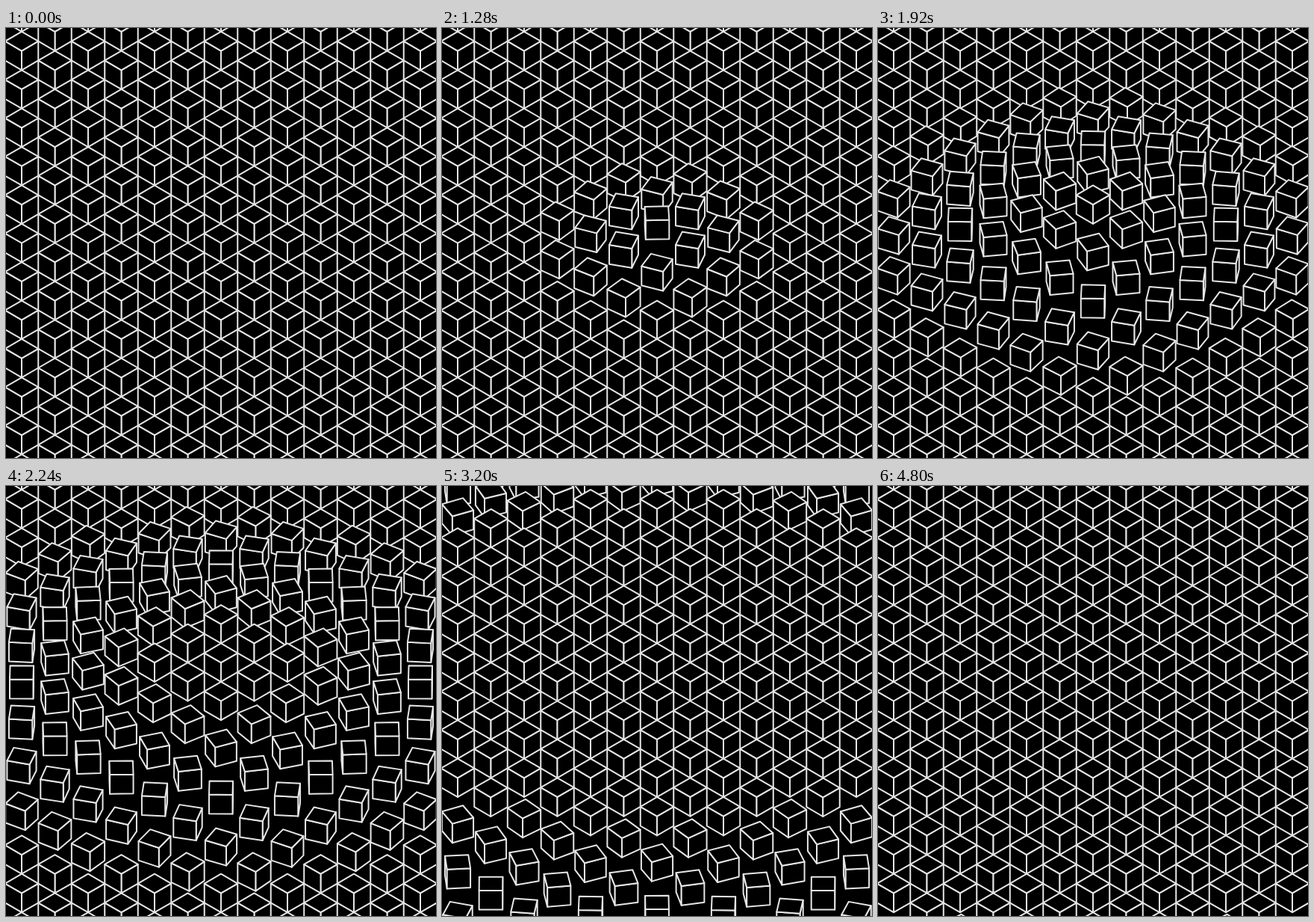
These frames come from a looping animation (576 px wide and 575 px high, 4840 ms). An HTML page with a canvas:

```html
<!DOCTYPE html>
<html lang="en">
<head>
<meta charset="utf-8">
<title>Rising cubes</title>
<style>
  html, body { margin: 0; width: 100%; height: 100%; overflow: hidden; background: #000; }
  canvas { display: block; width: 576px; height: 575px; }
</style>
</head>
<body>
<canvas id="stage" width="576" height="575"></canvas>
<script>
const W = 576, H = 575, LOOP = 4840, STEP = 40;
const COL = 44.5;                  // column spacing
const R = COL / Math.sqrt(3);      // edge length on screen
const SPAN = 3.03;                 // loop length, in units of one cube's turn
const DELAY = 0.00321;             // start delay per pixel of ground distance

const ctx = document.getElementById('stage').getContext('2d');
ctx.lineWidth = 2;
ctx.lineJoin = 'round';
ctx.strokeStyle = '#e6e6e6';
ctx.fillStyle = '#000';

const clamp = v => Math.min(1, Math.max(0, v));
const smooth = t => t * t * (3 - 2 * t);

// Isometric lattice, sorted back to front
const cubes = [];
for (let c = -7; c <= 7; c++) {
  for (let r = -8; r <= 8; r++) {
    const x = c * COL;
    const y = (2 * r + Math.abs(c % 2)) * R;
    cubes.push({ x: W / 2 + x, y: H / 2 + y, wait: Math.hypot(x, y * Math.sqrt(3)) * DELAY });
  }
}
cubes.sort((a, b) => a.y - b.y);

function face(points) {
  ctx.beginPath();
  for (const [x, y] of points) ctx.lineTo(x, y);
  ctx.closePath();
  ctx.fill();
  ctx.stroke();
}

function drawCube(x, y, turn) {
  const top = [], base = [];
  for (let k = 0; k < 4; k++) {
    const a = turn + k * Math.PI / 2;
    const px = x + COL / 2 * Math.sin(a);
    const py = y + R / 2 * Math.cos(a);
    top.push([px, py - R / 2]);
    base.push([px, py + R / 2]);
  }
  for (let k = 0; k < 4; k++) {
    const n = (k + 1) % 4;
    const facing = Math.cos(turn + (k + 0.5) * Math.PI / 2);
    if (facing > 1e-6) face([top[k], top[n], base[n], base[k]]);
  }
  face(top);
}

function draw(ms) {
  const now = SPAN * smooth(ms / LOOP);
  ctx.fillRect(0, 0, W, H);
  for (const { x, y, wait } of cubes) {
    const p = clamp(now - wait);
    drawCube(x, y - p * 2 * R, p * Math.PI / 2);
  }
}

const start = performance.now();
function tick() {
  const ms = (performance.now() - start) % LOOP;
  draw(Math.floor(ms / STEP) * STEP);
  requestAnimationFrame(tick);
}
tick();
</script>
</body>
</html>
```
